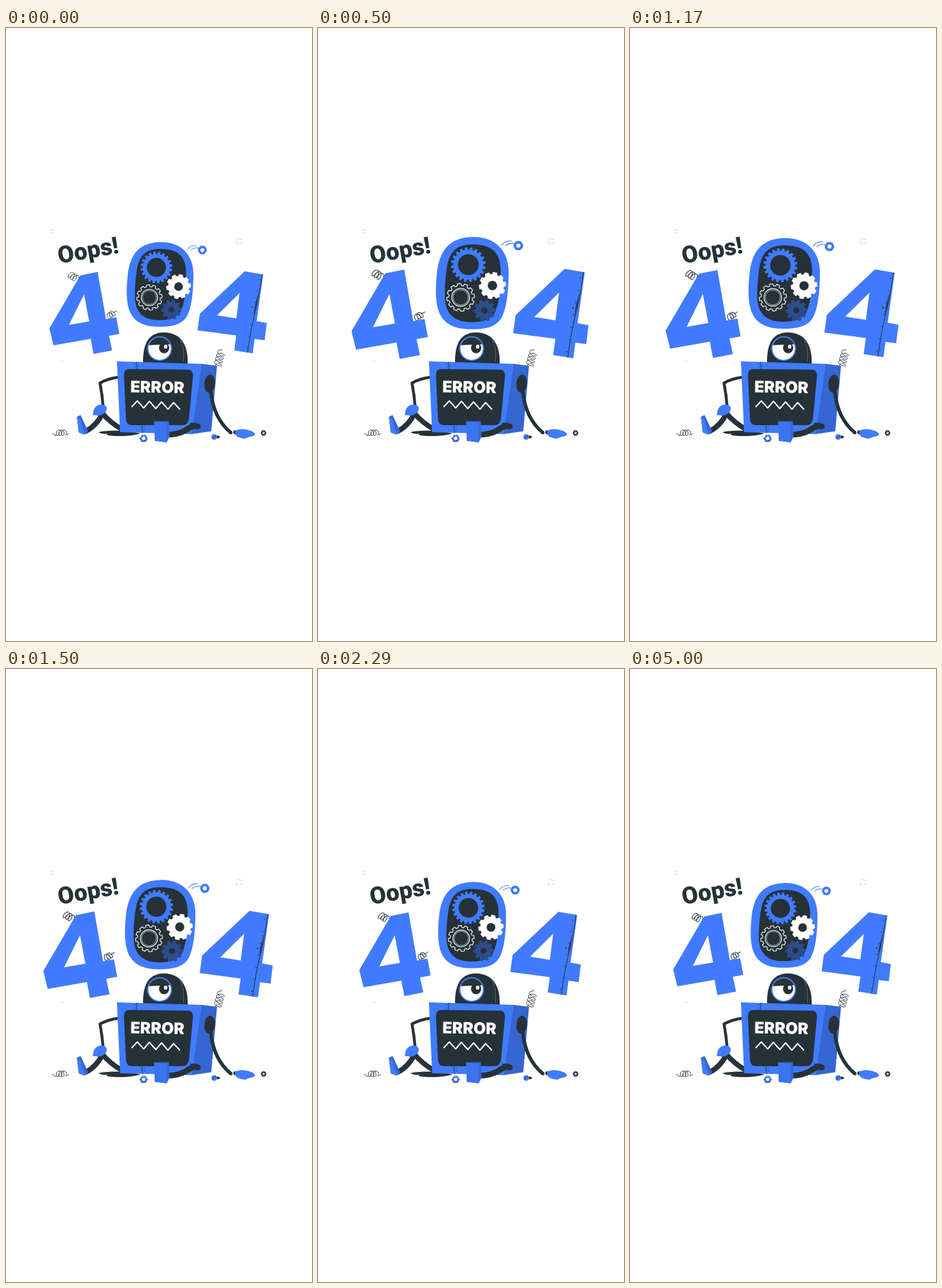
These frames come from a looping animation (480x960 px, 7.37 s). An HTML page with a canvas:

```html
<!DOCTYPE html>
<html lang="en">
<head>
<meta charset="utf-8">
<title>Broken robot</title>
<style>
html, body { margin: 0; width: 100%; height: 100%; overflow: hidden; background: #fff; }
canvas { display: block; width: 100vw; height: 100vh; }
</style>
</head>
<body>
<canvas id="stage"></canvas>
<script>
const W = 480, H = 960, LOOP = 7370, STEP = 1000 / 24;
const BLUE = '#407bff', SIDE = '#3566d2', DARK = '#263238', WHITE = '#fff', PALE = '#dcdcdc';
const canvas = document.getElementById('stage');
const ratio = window.devicePixelRatio || 1;
canvas.width = W * ratio;
canvas.height = H * ratio;
const c = canvas.getContext('2d');

function fill(d, color, rule = 'nonzero') {
  c.fillStyle = color;
  c.fill(new Path2D(d), rule);
}

function line(d, color, width, cap = 'round') {
  c.strokeStyle = color;
  c.lineWidth = width;
  c.lineCap = cap;
  c.lineJoin = 'round';
  c.stroke(new Path2D(d));
}

function disc(x, y, rx, color, ry = rx, turn = 0) {
  c.beginPath();
  c.ellipse(x, y, rx, ry, turn, 0, Math.PI * 2);
  c.fillStyle = color;
  c.fill();
}

function ring(x, y, r, color, width) {
  c.beginPath();
  c.arc(x, y, r, 0, Math.PI * 2);
  c.strokeStyle = color;
  c.lineWidth = width;
  c.stroke();
}

function text(str, x, y, font, color, degrees) {
  c.save();
  c.translate(x, y);
  c.rotate(degrees * Math.PI / 180);
  c.font = font;
  c.fillStyle = color;
  c.fillText(str, 0, 0);
  c.restore();
}

function gearPath(x, y, outer, inner, teeth, turn = 0) {
  const pitch = Math.PI * 2 / teeth;
  let d = '';
  for (let i = 0; i < teeth; i++) {
    for (const [part, r] of [[0, inner], [0.25, inner], [0.36, outer], [0.8, outer], [0.93, inner]]) {
      const a = turn + (i + part) * pitch;
      d += (d ? 'L' : 'M') + (x + r * Math.cos(a)) + ',' + (y + r * Math.sin(a));
    }
  }
  return d + 'Z';
}

function hexagon(x, y, r, color, hole, holeColor, turn = 0) {
  c.beginPath();
  for (let i = 0; i < 6; i++) {
    const a = turn + i * Math.PI / 3;
    c.lineTo(x + r * Math.cos(a), y + r * Math.sin(a));
  }
  c.fillStyle = color;
  c.fill();
  disc(x, y, hole, holeColor);
}

// A coil that travels from one point to the other.
function spring(x0, y0, x1, y1, loops, long, short, color = DARK, width = 1) {
  const dir = Math.atan2(y1 - y0, x1 - x0);
  const ux = Math.cos(dir), uy = Math.sin(dir);
  c.beginPath();
  for (let i = 0; i <= loops * 24; i++) {
    const u = i / (loops * 24), a = i / 24 * Math.PI * 2;
    const along = short * Math.cos(a), across = long * Math.sin(a);
    c.lineTo(x0 + (x1 - x0) * u + along * ux - across * uy,
             y0 + (y1 - y0) * u + along * uy + across * ux);
  }
  c.strokeStyle = color;
  c.lineWidth = width;
  c.stroke();
}

function leftFour() {
  spring(100, 386, 111, 393, 3, 5.5, 3);
  spring(160, 452, 169, 446, 2.6, 4.6, 3);
  line('M168,446 L173.5,443', DARK, 1);
  fill('M116.5,387.5 L143.8,382 L156.8,456 L173,453 L177.8,479 L161.5,482 L166.5,505 L137.3,510.5 L132.8,486.7 ' +
       'L74.5,497 L68,470.5 Z M122.5,417 L98.8,465 L130.5,459.5 Z', BLUE, 'evenodd');
}

function rightFour() {
  fill('M374.5,381 L403.5,386 L393.2,459 L409,462 L405.7,489 L390,487 L387,509.5 L358,505 L361.3,481.5 ' +
       'L300.5,473.5 L304,447.5 Z M366.5,415 L331,450 L361.3,454.8 Z', BLUE, 'evenodd');
  line('M401.5,386 Q396,428 390,447 Q384,472 379,508', DARK, 1);
  fill('M396,413 L390,438 L388.5,449 L393,433 Z', DARK);
  for (let i = 0; i < 7; i++) disc(397 - i * 3.2, 394 + i * 17.7, 0.8, DARK);
  disc(386.5, 437, 1.1, DARK);
}

function zero() {
  fill('M240,335.3 C275,334 293,355 294,383 C294,415 291,438 284,451 C276,465 260,467.8 241,467.8 ' +
       'C217,468 200,461 193,441 C188,425 189,405 191,386 C195,355 208,337 240,335.3 Z', BLUE);
  fill('M242,346 C267,346 282,355 282.5,382 C283,410 280,430 275,442 C268,455 255,457.5 241,457.5 ' +
       'C220,458 206,449 203,430 C201,415 203,395 205,380 C209,355 220,346 242,346 Z', DARK);

  fill(gearPath(236, 375, 25, 21.5, 20), BLUE);
  disc(236, 375, 15, DARK);

  fill(gearPath(259.3, 441, 16, 12.5, 10, 0.2), '#2e4b8c');
  disc(259.3, 441, 4.5, DARK);

  line(gearPath(225, 422, 20, 17, 12, 0.1), WHITE, 1.1);
  ring(225, 422, 12.8, WHITE, 1.1);
  ring(225, 422, 11, WHITE, 0.6);

  const white = gearPath(270.7, 405, 19, 16, 10, 0.15);
  fill(white, WHITE);
  line(white, WHITE, 1);
  disc(270.7, 405, 6.8, DARK);
}

function flyingNut() {
  line('M284,347 Q290,339.5 298,341', BLUE, 1);
  line('M289.5,348 Q294,343.5 301.5,344.5', BLUE, 1);
  hexagon(308, 347.7, 7.2, BLUE, 2.8, WHITE, 0.2);
  line(gearPath(308, 347.7, 6.4, 5.6, 6, 0.2), BLUE, 1);
  disc(308, 347.7, 2.8, WHITE);
}

function head() {
  fill('M215,525 C214.5,500 220,477 248,476.8 C273,477 286,495 285,526 Z', DARK);
  line('M273,487 Q280,500 278.5,522', '#66737a', 0.8);
  disc(241, 502, 19.5, BLUE);
  disc(241, 502, 17.7, WHITE);
  c.save();
  c.beginPath();
  c.arc(241, 502, 17.7, 0, Math.PI * 2);
  c.clip();
  disc(248, 501, 8, DARK, 8.5);
  fill('M220,480 H264 V495 L220,497 Z', DARK);
  disc(250.5, 499, 2.7, WHITE, 3.2);
  c.restore();
}

function body() {
  fill('M307,526 L331,529 L322,631.5 L291,636 Z', SIDE);
  fill('M174,522 L307.5,526 L292,636 L179,633 Z', BLUE);
  line('M307.5,526 L292,636', '#315fc4', 0.7);
  line('M205,523 V534 M213,622 L214,634', DARK, 1);
  for (const [x, y] of [[202, 526], [202, 531], [217, 625], [217, 630]]) disc(x, y, 0.7, DARK);
  fill('M194,534 L285,535 Q294,535.5 293.3,545 L287,612 Q286,621.5 277,622 L198,622 ' +
       'Q189,622 188.3,613 L185,543 Q185,534 194,534 Z', DARK);
  text('ERROR', 195, 570.5, '900 25px Inter, Arial, sans-serif', WHITE, 1);
  line('M197,593.5 L206,584 L216,595 L225,584.5 L235,596 L244,585.5 L254,597 L263,586.5 L273,597.5', WHITE, 2, 'butt');
}

function leftLimbs() {
  fill('M145,633 C156,629.5 190,629 211,635 C198,639.5 172,640 161,638 Q156,636.5 159,635.5 Q149,636 145,633 Z', DARK);
  line('M176,547 Q160,549 147.5,556 Q151,575 152.5,594', DARK, 4.5);
  line('M126,631 Q143,622 152,602', DARK, 8);
  line('M150,602 Q164,619 183,629', DARK, 8);
  fill('M137,601 C138,592 148,587 155,591 C160,594 159,600 153,604 C147,609 140,606 136,606 Z', BLUE);
  fill('M111,609 L117,606 L129,632 L123,637 Z', SIDE);
  fill('M111,609 L117,613 L123.5,637 L114,633.5 Z', BLUE);
}

function rightLimbs() {
  line('M251,637 Q274,637 288,626 Q295,622 301,624', DARK, 9);
  fill('M288,619 Q300,615 305,625 L300,628 Z', DARK);
  fill('M232.5,616 L255.5,615.5 L256.5,640 L252,649 L233.5,646.5 Z', SIDE);
  fill('M232.5,616 L252,618 L251.5,648.5 L233.5,646.5 Z', '#3c73ef');
  disc(319.5, 557, 8.5, DARK, 14, 0.08);
  line('M321,567 Q325,611 352.5,633.5', DARK, 5.5);
  disc(359.5, 633, 3, DARK);
  fill('M359,631 C365,627 374,628 380,629.5 C386,631 391,634 390.5,637 C388,641 380,639 376,643 ' +
       'C371,643 362,641 360,637 Z', BLUE);
}

function debris() {
  spring(332, 528, 338, 507, 4, 6, 3);
  line('M327,530 L331,525', DARK, 1);
  spring(80, 634, 92, 634, 3, 4.5, 3);
  line('M73,635 Q76,639 79,638 M93,637 L98,635.5', DARK, 1);
  hexagon(216, 642.5, 6, BLUE, 2.8, WHITE);
  line('M210,642.5 L213,647.7 H219 L222,642.5', DARK, 1);
  line('M328,640.5 H333.5', DARK, 4);
  hexagon(326.5, 640.5, 4.8, BLUE, 0.1, BLUE, 0.3);
  line('M324,643 L329,637.5', DARK, 1);
  hexagon(404, 634.2, 4.6, DARK, 2, '#a9c4ff');

  line('M69,318 Q71,314.5 75,317 M70,321 Q73,322 75,320', PALE, 1.3);
  line('M361,332 Q361,328 365,330 L370,331 M370,334 L367,339 M361,335 L363,339', PALE, 1.3);
  line('M85,520 L88,523 L91,521', PALE, 1);
}

// Quick swell, then a slow linear settle.
function pulse(ms) {
  const peak = 550, end = 2700, gain = 0.0995;
  return 1 + gain * (ms < peak ? ms / peak : (end - ms) / (end - peak));
}

function draw(now) {
  const t = now % LOOP;
  const tick = t >= 5000 ? 64 : Math.min(63, Math.floor((t + 3.4) / STEP));
  const s = pulse(tick * STEP);

  c.setTransform(ratio, 0, 0, ratio, 0, 0);
  c.fillStyle = WHITE;
  c.fillRect(0, 0, W, H);
  debris();
  text('Oops!', 83.5, 369, '900 37px Roboto, Arial, sans-serif', DARK, -10);

  c.save();
  c.translate(238.5, 423.5);
  c.scale(s, s);
  c.translate(-238.5, -423.5);
  leftFour();
  rightFour();
  zero();
  flyingNut();
  c.restore();

  head();
  leftLimbs();
  body();
  rightLimbs();
  hexagon(216, 642.5, 5.4, BLUE, 2.6, WHITE);
}

const start = performance.now();
function loop() {
  draw(performance.now() - start);
  requestAnimationFrame(loop);
}
loop();
</script>
</body>
</html>
```
